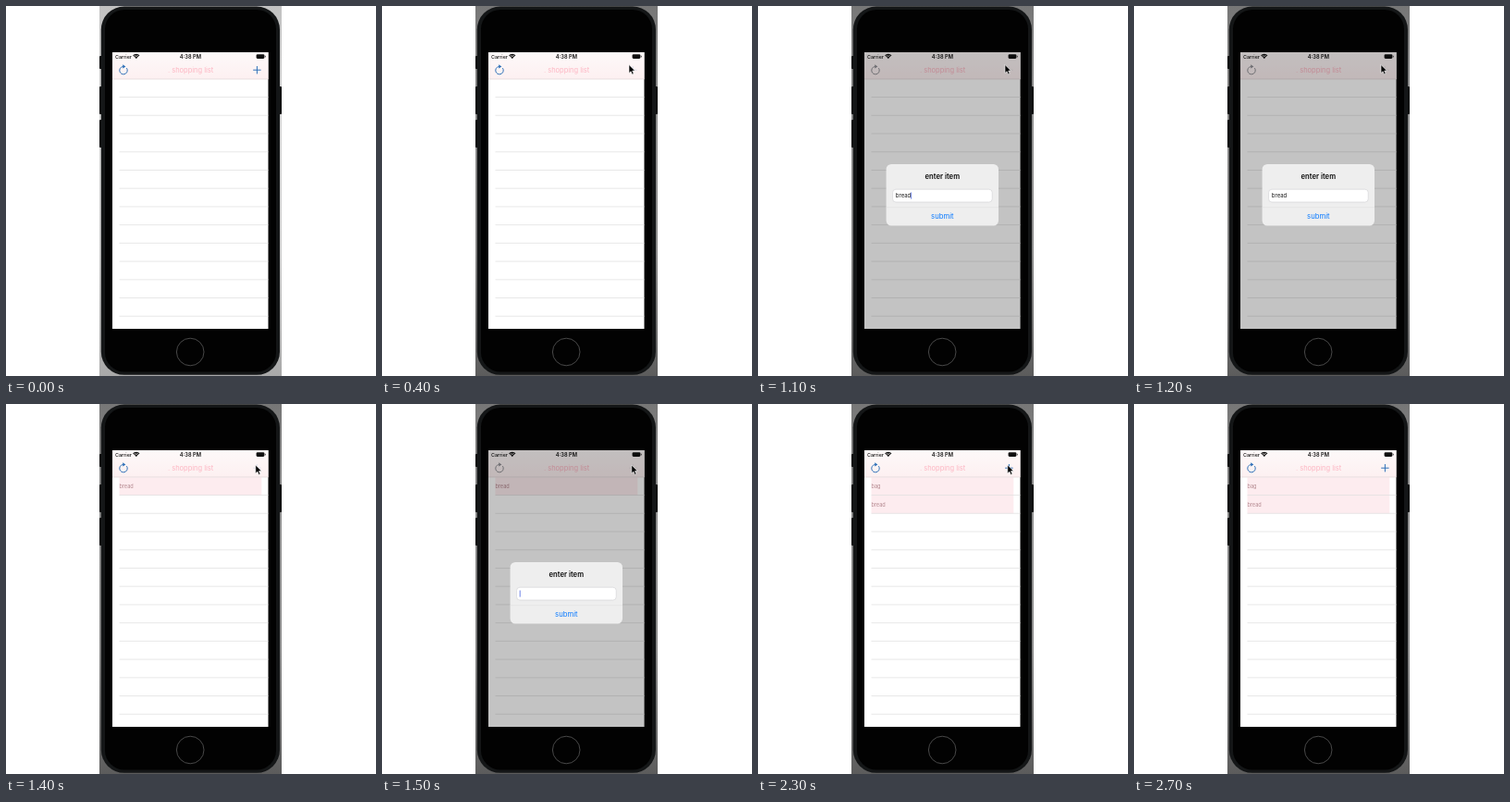
Write an HTML page with a canvas that moves like this. It is 400 px wide and 400 px high and loops after 2800 ms.

```html
<!DOCTYPE html>
<html lang="en">
<head>
<meta charset="utf-8">
<title>Shopping list</title>
<style>
html, body { margin: 0; width: 100%; height: 100%; overflow: hidden; background: #fff; }
canvas { display: block; width: 400px; height: 400px; }
</style>
</head>
<body>
<canvas id="stage"></canvas>
<script>
const LOOP = 2800, STEP = 100;
const FONT = 'Inter, "Liberation Sans", sans-serif';
const SCREEN = { x: 115, y: 50, w: 168.5, h: 299 };
const ROW_TOP = 79, ROW_H = 19.73;
const canvas = document.getElementById('stage');
const ctx = canvas.getContext('2d');
const dpr = window.devicePixelRatio || 1;
canvas.width = canvas.height = 400 * dpr;

function box(x, y, w, h, r, fill, stroke, width = 1) {
  ctx.beginPath();
  ctx.roundRect(x, y, w, h, r);
  if (fill) { ctx.fillStyle = fill; ctx.fill(); }
  if (stroke) { ctx.strokeStyle = stroke; ctx.lineWidth = width; ctx.stroke(); }
}

function line(x1, y1, x2, y2, color, width) {
  ctx.beginPath();
  ctx.moveTo(x1, y1);
  ctx.lineTo(x2, y2);
  ctx.strokeStyle = color;
  ctx.lineWidth = width;
  ctx.stroke();
}

function arc(x, y, r, from, to, color, width) {
  ctx.beginPath();
  ctx.arc(x, y, r, from, to);
  ctx.strokeStyle = color;
  ctx.lineWidth = width;
  ctx.stroke();
}

function text(str, x, y, size, color, weight = 400, align = 'left') {
  ctx.font = `${weight} ${size}px ${FONT}`;
  ctx.textAlign = align;
  ctx.fillStyle = color;
  ctx.fillText(str, x, y);
}

function polygon(points, fill) {
  ctx.beginPath();
  points.forEach(([x, y]) => ctx.lineTo(x, y));
  ctx.closePath();
  ctx.fillStyle = fill;
  ctx.fill();
}

function verticalFill(y1, y2, ...colors) {
  const g = ctx.createLinearGradient(0, y1, 0, y2);
  colors.forEach((c, i) => g.addColorStop(i / (colors.length - 1), c));
  return g;
}

function drawPhone(focused) {
  const shade = focused
    ? ['#777', '#929292', '#8c8c8c', '#5c5c5c']
    : ['#c2c2c2', '#d6d6d6', '#cfcfcf', '#a9a9a9'];
  box(101, 0, 197, 400, 0, verticalFill(0, 400, ...shade));
  [[101, 54, 14], [101, 87, 30], [101, 123, 30], [295, 87, 30]]
    .forEach(([x, y, h]) => box(x, y, 3, h, 0.8, '#0b0c0d'));
  box(102.8, 0.5, 193.2, 398.3, 25, '#141617');
  box(107, 4, 185, 391.5, 21, '#020202');
  arc(199.2, 374, 14.8, 0, Math.PI * 2, '#5a5a5a', 0.8);
}

function drawStatusBar() {
  text('Carrier', 118, 56.7, 5.4, '#111', 500);
  text('4:38 PM', 199.3, 56.8, 5.7, '#111', 600, 'center');
  for (const r of [1.6, 3.1, 4.6])
    arc(140.8, 57, r, -Math.PI * 0.75, -Math.PI * 0.25, '#111', 1.1);
  box(140.2, 55.9, 1.2, 1.2, 0.6, '#111');
  box(270.6, 52.2, 8.8, 4.7, 1.3, '#111');
  box(279.9, 53.7, 0.7, 1.7, 0.3, '#111');
}

function drawNavigation(s) {
  box(115, 50, 168.5, 29, 0, verticalFill(50, 79, '#fdf9f9', '#fdf0f1'));
  line(115, 79, 283.5, 79, '#dfd3d4', 0.7);
  drawStatusBar();
  text('. shopping list', 199.6, 71.8, 7.5, '#fdb5c2', 400, 'center');

  const tint = s.alert ? '#8f8f94' : '#2e70b8';
  arc(127, 69.6, 4.2, -Math.PI * 0.2, Math.PI * 1.48, tint, 1);
  polygon([[126.2, 63.2], [129.4, 65.4], [126.2, 67.6]], tint);
  ctx.globalAlpha = s.pressed ? 0.15 : 1;
  line(267.2, 69.2, 275.6, 69.2, tint, 1);
  line(271.4, 65, 271.4, 73.4, tint, 1);
  ctx.globalAlpha = 1;
}

function drawList(items) {
  items.forEach((item, i) => {
    const y = ROW_TOP + 0.3 + i * ROW_H;
    box(122.5, y, 153.8, ROW_H - 0.4, 0, '#fdecef');
    text(item, 122.4, y + 11.8, 5.6, '#b48990');
  });
  for (let i = 1; i <= 13; i++) {
    const y = ROW_TOP - 0.2 + i * ROW_H;
    line(122.5, y, 283.5, y, '#dedede', 0.7);
  }
}

function drawAlert({ typed, caret, scale = 1, alpha = 1 }) {
  ctx.save();
  ctx.globalAlpha = alpha;
  ctx.translate(199.3, 204.2);
  ctx.scale(scale, scale);
  ctx.translate(-199.3, -204.2);
  box(138.6, 171, 121.4, 66.5, 5.5, '#eeeeee');
  text('enter item', 199.3, 187.2, 7.7, '#0b0b0b', 600, 'center');
  box(145.6, 198.2, 107.6, 13.8, 3.4, '#fff', '#cfcfd2', 0.6);
  text(typed, 148.8, 207.3, 6, '#161616');
  if (caret) {
    const x = 149.2 + ctx.measureText(typed).width;
    line(x, 201.5, x, 208.6, '#4a64e0', 0.8);
  }
  line(138.6, 217.6, 260, 217.6, '#dedede', 0.5);
  text('submit', 199.3, 230.2, 7.7, '#0a7aff', 400, 'center');
  ctx.restore();
}

function drawPointer([x, y]) {
  const shape = [[0, 0], [0, 9], [2.1, 7.2], [3.5, 10.4], [5.1, 9.7], [3.7, 6.6], [6.4, 6.4]]
    .map(([dx, dy]) => [x + dx, y + dy]);
  polygon(shape, '#000');
  ctx.strokeStyle = '#fff';
  ctx.lineWidth = 0.6;
  ctx.stroke();
}

function pointerAt(t) {
  if (t < 100 || t >= 2600) return null;
  if (t < 400) return [267 + (400 - t) / 60, 63.5 + (400 - t) / 25];
  if (t < 1300) return [267, 63.5];
  if (t < 2400) return [269.8, 66];
  return t < 2500 ? [272, 55] : [274, 44.5];
}

// Each entry: start time, typed text, caret visible.
const TYPING = [
  [500, '', true], [600, '', true], [700, 'b', true], [800, 'br', true],
  [900, 'bre', true], [1000, 'brea', true], [1100, 'bread', true], [1200, 'bread', false],
  [1500, '', true], [1600, '', false], [1700, '', true], [1800, 'b', true],
  [1900, 'ba', true], [2000, 'bag', true], [2100, 'bag', true], [2200, 'bag', false]
];

function stateAt(t) {
  const open = (t >= 500 && t < 1300) || (t >= 1500 && t < 2300);
  let alert = null;
  if (open) {
    const [, typed, caret] = TYPING.filter(([start]) => start <= t).pop();
    const entering = t < 600;
    alert = { typed, caret, scale: entering ? 1.03 : 1, alpha: entering ? 0.88 : 1 };
  }
  return {
    alert,
    dim: open ? (t < 600 ? 0.205 : 0.235) : 0,
    items: t < 1300 ? [] : t < 2300 ? ['bread'] : ['bag', 'bread'],
    pressed: open || (t >= 400 && t < 500) || (t >= 1400 && t < 1500),
    pointer: pointerAt(t),
    focused: t >= 100
  };
}

function render(t) {
  const s = stateAt(t);
  ctx.setTransform(dpr, 0, 0, dpr, 0, 0);
  box(0, 0, 400, 400, 0, '#fff');
  drawPhone(s.focused);
  const { x, y, w, h } = SCREEN;
  box(x, y, w, h, 0, '#fff');
  drawList(s.items);
  drawNavigation(s);
  if (s.dim) box(x, y, w, h, 0, `rgba(0,0,0,${s.dim})`);
  if (s.alert) drawAlert(s.alert);
  if (s.pointer) drawPointer(s.pointer);
}

const start = performance.now();
function tick() {
  const t = (performance.now() - start) % LOOP;
  render(Math.floor(t / STEP) * STEP);
  requestAnimationFrame(tick);
}
tick();
</script>
</body>
</html>
```
